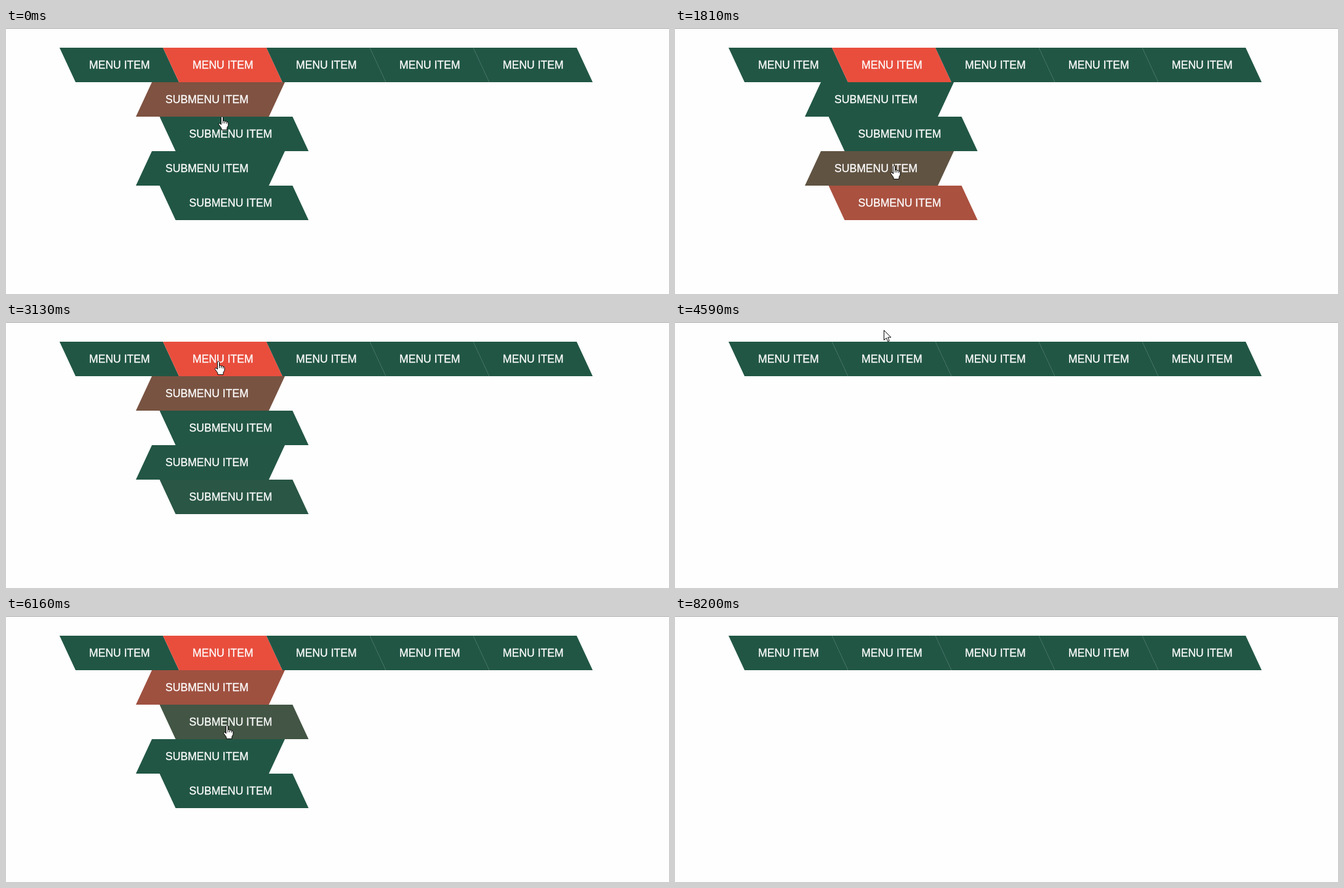
An HTML page with a canvas for the animation above (8450 ms loop, 1077 by 432 pixels).

```html
<!DOCTYPE html>
<html lang="en">
<head>
<meta charset="utf-8">
<title>Skewed menu</title>
<style>
html, body { margin: 0; width: 100%; height: 100%; overflow: hidden; background: #fefefe; }
canvas { display: block; }
</style>
</head>
<body>
<canvas id="stage" width="1077" height="432"></canvas>
<script>
const ctx = document.getElementById('stage').getContext('2d');

const LOOP = 8450, STEP = 120.7, LEAD = 10;
const FADE = 500, SLIDE = 300;
const TOP = 32, ROW = 56, ROWS = 4, LEAN = 13, PAD = 35;
const GREEN = [33, 86, 69], RED = [233, 78, 61];

// Turning points of the pointer: time, x, y
const PATH = [
  [-226, 347, 54], [0, 351.5, 143], [900, 361, 290],             // down the list
  [1597, 360, 290], [1810, 356.5, 223], [2160, 350, 120],        // up
  [2600, 358, 285], [2764, 358, 285], [2836, 349, 130],          // down, then a quick flick up
  [3138, 345.5, 63], [3400, 342, 60], [3700, 335, 7],            // off the menu
  [4480, 338, 7], [5360, 346, 56], [5723, 347, 56],              // back onto it
  [6085, 356, 144], [6156, 359.5, 177], [6580, 368, 211],        // down the list
  [7051, 428, 312], [7121, 448, 364], [7360, 513, 392], [8200, 708, 436]
];

const ARROW = new Path2D('M.5 .5V16.5L4.3 13L6.8 18.7L9.2 17.7L6.8 12H11.8Z');
const HAND = new Path2D('M-2 2Q-.5-.8 1 2V8Q2.7 6.8 4 8.5Q5.8 7.5 7 9.5Q9 8.8 9.5 11V15.5L7.5 19V22.5H-1.5V20L-6 13.5Q-5.8 10.8-3.5 12L-2 14Z');
const KNUCKLES = new Path2D('M1 8V12M4 8.5V12M7 9.5V12.5');

// cubic-bezier(.25, .1, .25, 1)
function ease(x) {
  if (x <= 0) return 0;
  if (x >= 1) return 1;
  let lo = 0, hi = 1, s;
  for (let i = 0; i < 20; i++) {
    s = (lo + hi) / 2;
    if (.75 * s * (1 - s) + s ** 3 < x) lo = s; else hi = s;
  }
  return .3 * s * (1 - s) ** 2 + 3 * (1 - s) * s * s + s ** 3;
}

function pointerAt(t) {
  const i = PATH.findIndex(p => p[0] > t);
  if (i < 0) return PATH[PATH.length - 1].slice(1);
  const [t0, x0, y0] = PATH[i - 1], [t1, x1, y1] = PATH[i];
  const p = (t - t0) / (t1 - t0);
  return [x0 + (x1 - x0) * p, y0 + (y1 - y0) * p];
}

// What lies under the pointer: -1 nothing, 0 the menu item, 1 to 4 a submenu row
function hoverAt(t) {
  const row = Math.floor((pointerAt(t)[1] - TOP) / ROW);
  return row >= 0 && row <= ROWS ? row : -1;
}

function findHovers() {
  const start = PATH[0][0];
  const list = [[start - FADE, hoverAt(start)]];
  for (let t = start; t < LOOP; t++) {
    const target = hoverAt(t);
    if (target !== list[list.length - 1][1]) list.push([t, target]);
  }
  return list;
}
const hovers = findHovers();

// Level of a reversible transition that follows the hover state
function transition(t, isActive) {
  let from = 0, goal = 0, start = hovers[0][0];
  const level = at => from + (goal - from) * ease((at - start) / FADE);
  for (const [at, target] of hovers) {
    if (at > t) break;
    const next = Number(isActive(target));
    if (next !== goal) {
      from = level(at);
      goal = next;
      start = at;
    }
  }
  return level(t);
}

function mix(p) {
  return `rgb(${GREEN.map((c, i) => Math.round(c + (RED[i] - c) * p))})`;
}

function item(label, x, y, width, lean, heat) {
  ctx.fillStyle = mix(heat);
  ctx.beginPath();
  ctx.moveTo(x - lean, y);
  ctx.lineTo(x + width - lean, y);
  ctx.lineTo(x + width + lean, y + ROW);
  ctx.lineTo(x + lean, y + ROW);
  ctx.fill();
  ctx.fillStyle = ctx.strokeStyle = '#fff';
  ctx.lineWidth = .3;
  ctx.fillText(label, x + PAD, y + 34);
  ctx.strokeText(label, x + PAD, y + 34);
}

function submenu(t) {
  const shift = SLIDE * (1 - transition(t, h => h >= 0));
  ctx.save();
  ctx.beginPath();
  ctx.rect(207, TOP + ROW, 288, ROWS * ROW);
  ctx.clip();
  for (let row = 1; row <= ROWS; row++) {
    const odd = row % 2;
    const x = odd ? 224 + shift : 262.5 - shift;
    const heat = transition(t, h => h === row);
    item('SUBMENU ITEM', x, TOP + row * ROW, 216, odd ? -LEAN : LEAN, heat);
  }
  ctx.restore();
}

function pointer(t, hand) {
  const shape = hand ? HAND : ARROW;
  ctx.save();
  ctx.translate(...pointerAt(t));
  ctx.fillStyle = '#fff';
  ctx.strokeStyle = '#000';
  ctx.lineWidth = 1;
  ctx.fill(shape);
  ctx.stroke(shape);
  if (hand) ctx.stroke(KNUCKLES);
  ctx.restore();
}

function draw(t) {
  const open = hoverAt(t) >= 0;
  ctx.fillStyle = '#fefefe';
  ctx.fillRect(0, 0, 1077, 432);
  ctx.fillStyle = '#a0a0a0';
  ctx.fillRect(0, 0, 1077, 1);
  ctx.font = '17.6px "Liberation Sans", Arial, sans-serif';
  for (let i = 0; i < 5; i++) {
    item('MENU ITEM', 100 + 168 * i, TOP, 168, LEAN, open && i === 1 ? 1 : 0);
  }
  submenu(t);
  pointer(t, open);
}

const begin = performance.now();
function tick() {
  const t = (performance.now() - begin) % LOOP;
  draw(Math.floor((t + LEAD) / STEP) * STEP);
  requestAnimationFrame(tick);
}
tick();
</script>
</body>
</html>
```
